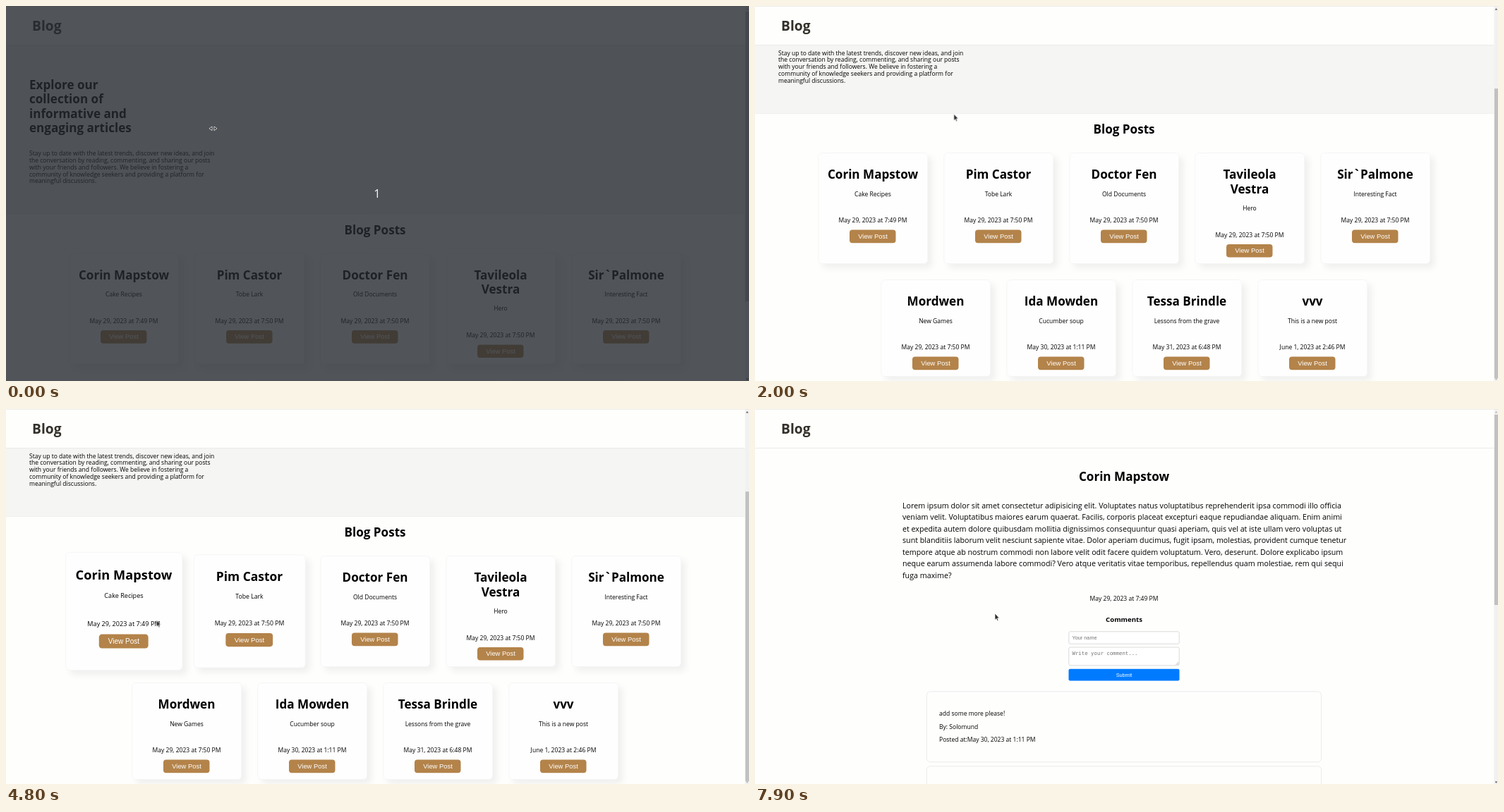
These frames come from a looping animation (1053x532 px, 8 s). An HTML page:

```html
<!DOCTYPE html>
<html lang="en">
<head>
<meta charset="utf-8">
<title>Blog</title>
<style>
@property --scroll { syntax: "<number>"; inherits: true; initial-value: 0; }

html, body { margin: 0; width: 100%; height: 100%; overflow: hidden; background: #fefefd; }
svg { display: block; width: 100vw; height: 100vh; animation: scroll 8s step-end infinite; }
text { font: 8.55px "Open Sans", "Noto Sans", sans-serif; white-space: pre; }
.mid { text-anchor: middle; }
.title { font-size: 17.1px; font-weight: 700; }
.logo { font-size: 19.2px; font-weight: 700; fill: #333029; }
.body { font-size: 10.69px; }
.sub { font-size: 9.6px; font-weight: 700; }
.button { font: 9.4px "Liberation Sans", Arial, sans-serif; fill: #fff; }
.small { font: 7.3px "Liberation Sans", Arial, sans-serif; }
.mono { font: 7.36px "DejaVu Sans Mono", monospace; }
.hint { fill: #757575; }
.field { fill: #fff; stroke: #ccc; stroke-width: .7; }
.note { fill: none; stroke: #e6e6e6; stroke-width: .8; }
.panel { fill: #fefefe; stroke: #f3f3f2; stroke-width: .7; filter: drop-shadow(6px 6px 4px rgba(0, 0, 0, .055)); }
.btn { fill: #b3834a; }

.scroller { transform: translateY(calc(var(--scroll) * -1px)); }
.thumb { fill: #c1c1c1; }
.list .thumb { transform: translateY(calc(var(--scroll) * .766px)); }
.post .thumb { transform: translateY(calc(var(--scroll) * .507px)); }
.up { opacity: calc(.4 + var(--scroll)); }
.down { opacity: calc(142.9 - var(--scroll)); }

.list { animation: list 8s step-end infinite; }
.post { animation: post 8s step-end infinite; }
.intro { animation: intro 8s step-end infinite; }
.pointer { animation: move 8s linear infinite; }
.arrow { animation: arrow 8s step-end infinite; }
.hand { animation: hand 8s step-end infinite; }
.card { transform-box: fill-box; transform-origin: center; }
.card0 { animation: grow0 8s linear infinite; }
.card1 { animation: grow1 8s linear infinite; }
.card2 { animation: grow2 8s linear infinite; }
.card3 { animation: grow3 8s linear infinite; }
.card0 .btn { animation: press 8s step-end infinite; }

@keyframes scroll {
  0% { --scroll: 0; }
  12.5% { --scroll: 20; }
  13.75% { --scroll: 49; }
  15% { --scroll: 78; }
  16.25% { --scroll: 100; }
  17.5% { --scroll: 114; }
  21.25% { --scroll: 128; }
  25% { --scroll: 142.5; }
  75% { --scroll: 120; }
  76.25% { --scroll: 95; }
  77.5% { --scroll: 70; }
  78.75% { --scroll: 45; }
  80% { --scroll: 20; }
  81.25%, 100% { --scroll: 0; }
}
@keyframes list { 0% { visibility: visible; } 73.75%, 100% { visibility: hidden; } }
@keyframes post { 0% { visibility: hidden; } 73.75%, 100% { visibility: visible; } }
@keyframes intro { 0% { visibility: visible; } 1.25%, 100% { visibility: hidden; } }
@keyframes arrow {
  0% { visibility: hidden; }
  1.25% { visibility: visible; }
  67.5% { visibility: hidden; }
  73.75%, 100% { visibility: visible; }
}
@keyframes hand {
  0% { visibility: hidden; }
  67.5% { visibility: visible; }
  73.75%, 100% { visibility: hidden; }
}
@keyframes press { 0% { fill: #b3834a; } 67.5%, 100% { fill: #91693d; } }
@keyframes grow0 {
  0%, 30% { transform: scale(1); }
  33.75%, 35% { transform: scale(1.1); }
  36.25% { transform: scale(1.06); }
  38.75%, 57.5% { transform: scale(1); }
  61.25%, 100% { transform: scale(1.1); }
}
@keyframes grow1 {
  0%, 35.6% { transform: scale(1); }
  37.5% { transform: scale(1.03); }
  40%, 55.6% { transform: scale(1); }
  57.5% { transform: scale(1.07); }
  58.75% { transform: scale(1.04); }
  61.25%, 100% { transform: scale(1); }
}
@keyframes grow2 {
  0%, 40.9% { transform: scale(1); }
  41.25% { transform: scale(1.005); }
  45%, 46.9% { transform: scale(1.1); }
  50%, 53.75% { transform: scale(1); }
  55.6% { transform: scale(1.06); }
  58%, 100% { transform: scale(1); }
}
@keyframes grow3 {
  0%, 48.1% { transform: scale(1); }
  50% { transform: scale(1.048); }
  52.5%, 53% { transform: scale(1.1); }
  56.75%, 100% { transform: scale(1); }
}
@keyframes move {
  0%, 11.25% { transform: translate(290px, 174px); }
  17.5% { transform: translate(288px, 168px); }
  25% { transform: translate(282px, 153px); }
  28.75% { transform: translate(215px, 215px); }
  31.25% { transform: translate(180px, 262px); }
  33.75% { transform: translate(195px, 278px); }
  35% { transform: translate(230px, 277px); }
  36.25% { transform: translate(300px, 275px); }
  37.5% { transform: translate(400px, 273px); }
  40% { transform: translate(441px, 271px); }
  41.25% { transform: translate(466px, 270px); }
  43.75% { transform: translate(520px, 274px); }
  46.25% { transform: translate(566px, 277px); }
  47.5% { transform: translate(622px, 279px); }
  50% { transform: translate(686px, 281px); }
  51.875% { transform: translate(690px, 283px); }
  53.75% { transform: translate(600px, 284px); }
  55% { transform: translate(490px, 284px); }
  56.25% { transform: translate(360px, 285px); }
  57.5% { transform: translate(259px, 288px); }
  58.75% { transform: translate(225px, 295px); }
  62.5% { transform: translate(190px, 308px); }
  67.5% { transform: translate(184px, 322px); }
  70% { transform: translate(188px, 327px); }
  71.25%, 73.7% { transform: translate(175px, 326px); }
  82.5% { transform: translate(174px, 325px); }
  86.25% { transform: translate(240px, 200px); }
  88.75% { transform: translate(340px, 130px); }
  92.5% { transform: translate(450px, 170px); }
  95% { transform: translate(448px, 215px); }
  97.5% { transform: translate(325px, 298px); }
  98.75%, 100% { transform: translate(340px, 290px); }
}
</style>
</head>
<body>
<svg viewBox="0 0 1053 532" id="stage"></svg>
<script>
const posts = [
  ["Corin Mapstow", "Cake Recipes", "May 29, 2023 at 7:49 PM"],
  ["Pim Castor", "Tobe Lark", "May 29, 2023 at 7:50 PM"],
  ["Doctor Fen", "Old Documents", "May 29, 2023 at 7:50 PM"],
  ["Tavileola|Vestra", "Hero", "May 29, 2023 at 7:50 PM"],
  ["Sir`Palmone", "Interesting Fact", "May 29, 2023 at 7:50 PM"],
  ["Mordwen", "New Games", "May 29, 2023 at 7:50 PM"],
  ["Ida Mowden", "Cucumber soup", "May 30, 2023 at 1:11 PM"],
  ["Tessa Brindle", "Lessons from the grave", "May 31, 2023 at 6:48 PM"],
  ["vvv", "This is a new post", "June 1, 2023 at 2:46 PM"],
];
const headline = ["Explore our", "collection of", "informative and", "engaging articles"];
const intro = [
  "Stay up to date with the latest trends, discover new ideas, and join",
  "the conversation by reading, commenting, and sharing our posts",
  "with your friends and followers. We believe in fostering a",
  "community of knowledge seekers and providing a platform for",
  "meaningful discussions.",
];
const article = [
  "Lorem ipsum dolor sit amet consectetur adipisicing elit. Voluptates natus voluptatibus reprehenderit ipsa commodi illo officia",
  "veniam velit. Voluptatibus maiores earum quaerat. Facilis, corporis placeat excepturi eaque repudiandae aliquam. Enim animi",
  "et expedita autem dolore quibusdam mollitia dignissimos consequuntur quasi aperiam, quis vel at iste ullam vero voluptas ut",
  "sunt blanditiis laborum velit nesciunt sapiente vitae. Dolor aperiam ducimus, fugit ipsam, molestias, provident cumque tenetur",
  "tempore atque ab nostrum commodi non labore velit odit facere quidem voluptatum. Vero, deserunt. Dolore explicabo ipsum",
  "neque earum assumenda labore commodi? Vero atque veritatis vitae temporibus, repellendus quam molestiae, rem qui sequi",
  "fuga maxime?",
];

const text = (x, y, str, cls = "") => `<text x="${x}" y="${y}" class="${cls}">${str}</text>`;
const lines = (x, y, step, list, cls) => list.map((str, i) => text(x, y + i * step, str, cls)).join("");
const rect = (x, y, w, h, attrs = "") => `<rect x="${x}" y="${y}" width="${w}" height="${h}" ${attrs}/>`;

function card([name, topic, date], i) {
  const lower = i > 4;
  const x = lower ? 256 + (i - 5) * 178 : 167 + i * 178;
  const y = lower ? 531 : 351;
  const title = name.split("|");
  const base = y + (title.length - 1) * 20.4;
  return `<g class="card card${i}">
    ${rect(x - 77.2, y, 155, lower ? 137 : 157, 'rx="5.5" class="panel"')}
    ${lines(x, y + 36.7, 20.4, title, "mid title")}
    ${text(x, base + 61, topic, "mid")}
    ${text(x, base + 98.6, date, "mid")}
    ${rect(x - 33, base + 109, 65.5, 18.7, 'rx="4" class="btn"')}
    ${text(x, base + 121.4, "View Post", "mid button")}
  </g>`;
}

const scrollbar = thumb => `
  ${rect(1047.3, 0, 5.7, 532, 'fill="#f1f1f1"')}
  ${rect(1047.9, 8, 5.1, thumb, 'class="thumb"')}
  <path class="up" d="M1048.6 5.4h3.6l-1.8-2.2z" fill="#505050"/>
  <path class="down" d="M1048.6 528.6h3.6l-1.8 2.2z" fill="#505050"/>`;

const listPage = `<g class="list">
  <g class="scroller">
    ${rect(0, 55, 1047.3, 240, 'fill="#f5f5f3"')}
    ${rect(0, 294.5, 1047.3, .6, 'fill="#ececea"')}
    ${lines(33, 117.7, 20.4, headline, "title")}
    ${lines(33, 212, 9.87, intro)}
    ${text(523, 323.5, "Blog Posts", "mid title")}
    ${posts.map(card).join("")}
  </g>
  ${scrollbar(411)}
</g>`;

const postPage = `<g class="post">
  <g class="scroller">
    ${text(523, 101.7, posts[0][0], "mid title")}
    ${lines(209, 140.7, 16.5, article, "body")}
    ${text(523, 272, posts[0][2], "mid")}
    ${text(523, 302.4, "Comments", "mid sub")}
    ${rect(444.8, 315.8, 156.4, 17.4, 'rx="2" class="field"')}
    ${text(449.5, 327, "Your name", "small hint")}
    ${rect(444.8, 338, 156.4, 25.8, 'rx="2" class="field"')}
    ${text(449.5, 349.4, "Write your comment...", "mono hint")}
    <path d="M596.5 363l4-4m-1.8 4l1.8-1.8" stroke="#888" stroke-width=".6"/>
    ${rect(444.5, 368.8, 157, 16.8, 'rx="2" fill="#007bff"')}
    ${text(523, 379.8, "Submit", "mid small").replace("<text", '<text fill="#fff"')}
    ${[400.8, 506.8, 612.8].map(y => rect(243.3, y, 559.4, 100, 'rx="5" class="note"')).join("")}
    ${lines(261, 435, 18.6, ["add some more please!", "By: Solomund", "Posted at:May 30, 2023 at 1:11 PM"])}
  </g>
  ${scrollbar(270)}
</g>`;

const header = `
  ${rect(0, 0, 1047.3, 55.5, 'fill="#fefefd"')}
  ${rect(0, 0, 1053, .8, 'fill="#e9e9e8"')}
  ${rect(0, 55, 1047.3, .8, 'fill="#e9e9e7"')}
  ${text(37, 35.2, "Blog", "logo")}`;

const countdown = `<g class="intro">
  ${rect(0, 0, 1053, 532, 'fill="rgb(38,43,49)" fill-opacity=".8"')}
  <text x="526" y="272" class="mid" style="font-size:16.5px;fill:#eef8fc">1</text>
  <path d="M292 171v5.6l-4-2.8zM295 171v5.6l4-2.8z" fill="#333" stroke="#eee" stroke-width=".8"/>
</g>`;

const pointer = `<g class="pointer" stroke="#fff" stroke-width=".7" fill="#2b2b2b">
  <path class="arrow" d="M0 0V9.3L2.1 7.4L3.6 10.6L5 10L3.6 6.8H6.3Z"/>
  <path class="hand" d="M1 .4Q2 -.2 2.6 .8V4L6.4 4.9Q7.4 5.3 7.3 6.4L6.5 9.6V11.6H2.4V10L0 6.8Q.2 5.7 1 6.2Z"/>
</g>`;

// The header sits above the scrolled content but below the scrollbars' column.
document.getElementById("stage").innerHTML = listPage + postPage + header + countdown + pointer;
</script>
</body>
</html>
```
